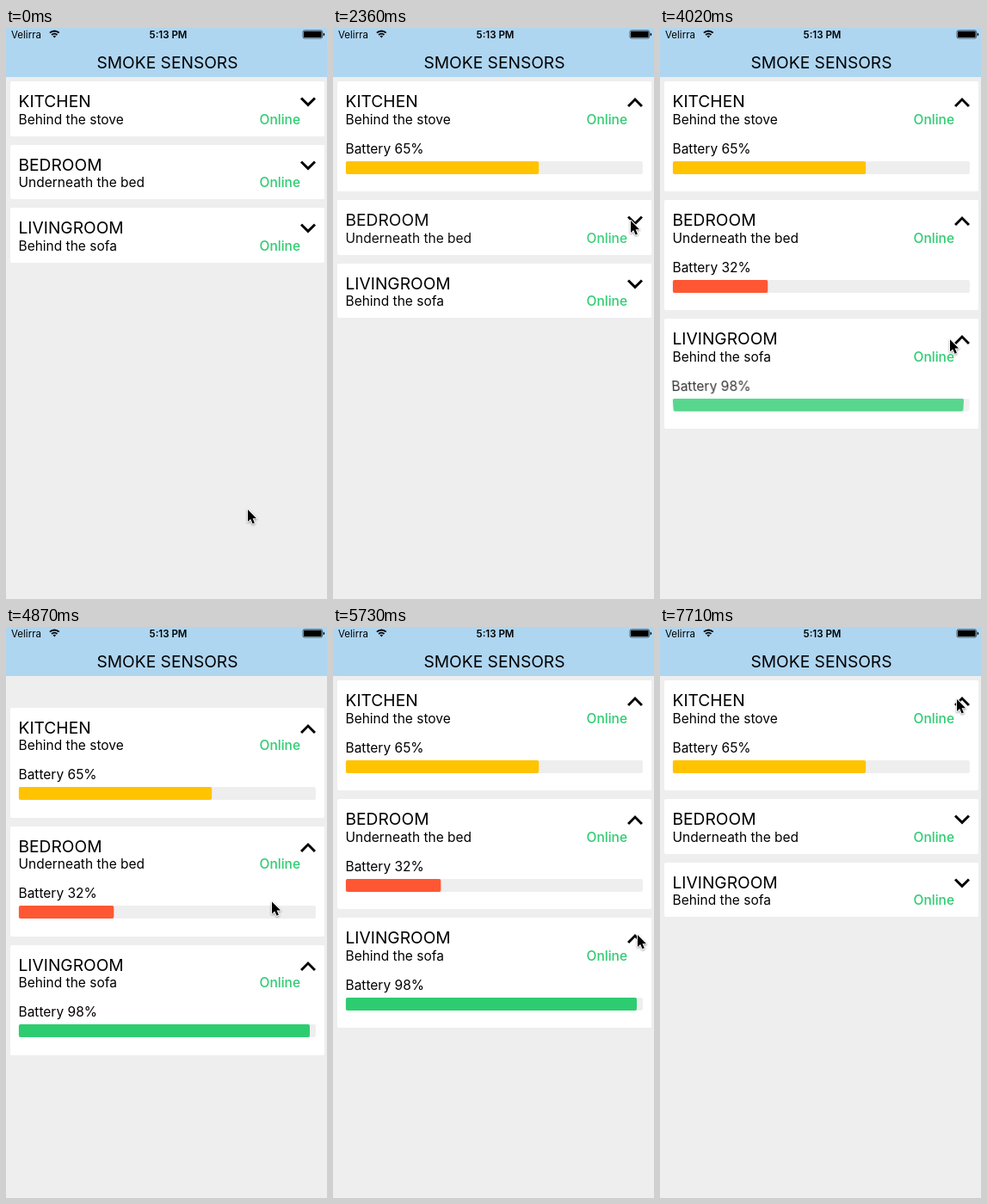
Write an HTML page that moves like this. It is 373 px wide and 664 px high and loops after 8 s.

```html
<!DOCTYPE html>
<html lang="en">
<head>
<meta charset="utf-8">
<title>Smoke sensors</title>
<style>
  html, body { margin: 0; width: 100%; height: 100%; overflow: hidden; background: #eee; }
  #stage { position: absolute; left: 0; top: 0; width: 373px; height: 664px; overflow: hidden;
    background: #eee; color: #000; font: 15.5px/20px Inter, Roboto, sans-serif; white-space: nowrap; }
  #stage * { position: absolute; }
  #top { left: 0; top: 0; width: 373px; height: 57px; background: #aed6f1; }
  .title { font-size: 19.2px; }
  #top .title { left: 0; width: 373px; top: 30px; text-align: center; text-indent: 2px; }
  .status { top: -2.5px; font-size: 11.5px; }
  #time { left: 0; width: 377px; text-align: center; font-weight: 600; }
  svg { left: 0; top: 0; overflow: visible; }
  .card { left: 5px; width: 365px; background: #fff; border-radius: 2px; overflow: hidden; }
  .head, .panel { left: 0; width: 365px; }
  .head { top: 0; height: 63.5px; }
  .head .title { left: 9.5px; top: 13px; }
  .place { left: 9.5px; top: 34.5px; }
  .state { right: 28px; top: 34.5px; color: #2ecc71; font-weight: 500; }
  .panel { top: 63.5px; height: 64.5px; }
  .label { left: 9.5px; top: 5px; }
  #cursor { filter: drop-shadow(0 1px 1px rgba(0,0,0,.4)); }
</style>
</head>
<body>
<div id="stage">
  <div id="list"></div>
  <div id="top">
    <span class="status" style="left:6px">Velirra</span>
    <span class="status" id="time">5:13 PM</span>
    <svg width="373" height="20">
      <g fill="none" stroke="#000" stroke-width="1.9">
        <path d="M50.9 5.7A7.6 7.6 0 0 1 61.7 5.7"/>
        <path d="M53.1 8A4.5 4.5 0 0 1 59.5 8"/>
      </g>
      <path d="M54.5 9.6A2.6 2.6 0 0 1 58.1 9.6L56.3 11.6Z"/>
      <rect x="345" y="2.8" width="22.6" height="9.2" rx="1.8" fill="none" stroke="#000" stroke-width=".6"/>
      <rect x="346" y="3.8" width="20.6" height="7.2" rx=".8"/>
      <path d="M368.7 5.6Q370.2 6 370.2 7.4T368.7 9.2Z"/>
    </svg>
    <span class="title">SMOKE SENSORS</span>
  </div>
  <svg id="cursor" width="14" height="20">
    <path d="M0 0V14L3.2 11.1L5.6 16.4L7.9 15.4L5.6 10.2H10.1Z" stroke="#fff" stroke-width="1.8"
      stroke-linejoin="round" paint-order="stroke"/>
  </svg>
</div>
<script>
const LOOP = 8000, SHUT = 63.5, FULL = 128, GAP = 10, BAR = 345;
const OPEN_WAIT = 116, OPEN_TIME = 425, CLOSE_TIME = 340;
const CHEVRON = {
  down: 'M352.9 18.4L346 25.3L339.1 18.4L337 20.5L346 29.5L355 20.5Z',
  up: 'M346 18.9L337 27.9L339.1 30L346 23.1L352.9 30L355 27.9Z'
};

// open / close are the moments of the taps
const sensors = [
  { name: 'KITCHEN', place: 'Behind the stove', level: 65, color: '#ffc300', open: 1545, close: Infinity },
  { name: 'BEDROOM', place: 'Underneath the bed', level: 32, color: '#ff5733', open: 2355, close: 7075 },
  { name: 'LIVINGROOM', place: 'Behind the sofa', level: 98, color: '#2ecc71', open: 3785, close: 6368 }
];

const clamp = v => Math.max(0, Math.min(1, v));
const linear = u => u;
const smooth = u => u * u * (3 - 2 * u);
const easeOut = u => 1 - (1 - u) * (1 - u);

// cubic-bezier(.25, .1, .25, 1)
function ease(x) {
  const at = (s, a, b) => 3 * s * (1 - s) * (1 - s) * a + 3 * s * s * (1 - s) * b + s * s * s;
  let lo = 0, hi = 1;
  for (let i = 0; i < 24; i++) {
    const mid = (lo + hi) / 2;
    if (at(mid, .25, .25) < x) lo = mid; else hi = mid;
  }
  return at(lo, .1, 1);
}

// piecewise linear through [position, value] stops
function ramp(u, stops) {
  for (let i = 1; i < stops.length; i++) {
    const [a, va] = stops[i - 1], [b, vb] = stops[i];
    if (u <= b) return va + (vb - va) * clamp((u - a) / (b - a));
  }
  return stops[stops.length - 1][1];
}

const moves = [
  { from: 30, till: 420, to: [274.5, 503.5] },
  { from: 690, till: 1480, to: [342, 92], bend: [256, 300] },
  { from: 1750, till: 2060, to: [346, 224] },
  { from: 2700, till: 3130, to: [343, 325], bend: [377, 228], pace: linear },
  { from: 3150, till: 3490, to: [337, 362.3], pace: easeOut },
  { from: 4060, till: 4590, to: [309, 258] },
  { from: 4660, till: 4980, to: [309, 342] },
  { from: 5180, till: 5390, to: [311, 324] },
  { from: 5400, till: 5740, to: [354, 358] },
  { from: 5740, till: 6020, to: [348, 361] },
  { from: 6560, till: 6910, to: [346, 222] },
  { from: 7260, till: 7700, to: [345, 84] }
];

function pointer(t) {
  let pos = [281, 560];
  for (const m of moves) {
    if (t <= m.from) break;
    const u = (m.pace || smooth)(clamp((t - m.from) / (m.till - m.from)));
    pos = pos.map((p, i) => {
      const mid = m.bend ? m.bend[i] : (p + m.to[i]) / 2;
      return (1 - u) * (1 - u) * p + 2 * u * (1 - u) * mid + u * u * m.to[i];
    });
  }
  return pos;
}

// rubber band while dragging, damped spring after release
function scrollOffset(t) {
  const view = 607, pull = y => (1 - 1 / (y * .55 / view + 1)) * view;
  if (t < 4660) return 0;
  if (t < 5170) return pull(pointer(t)[1] - 258);
  const w = 13 * (t - 5170) / 1000;
  return w > 11 ? 0 : pull(84) * (1 + w) * Math.exp(-w);
}

const press = dt => ramp(dt, [[0, 1], [90, .25], [200, 1]]);

function flip(s, t) {
  if (t >= s.close) {
    const u = ease(clamp((t - s.close) / CLOSE_TIME));
    return { angle: ramp(u, [[0, 0], [.3, -20], [1, 90]]), alpha: ramp(u, [[.3, 1], [1, 0]]) };
  }
  const u = ease(clamp((t - s.open - OPEN_WAIT) / OPEN_TIME));
  return {
    angle: ramp(u, [[0, 90], [.4, -20], [.6, 10], [.8, -5], [1, 0]]),
    alpha: ramp(u, [[0, 0], [.6, 1]])
  };
}

const list = document.getElementById('list');
const cursor = document.getElementById('cursor');
const bar = (width, color) =>
  `<rect x="9.9" y="29" width="${width}" height="15" rx="2" fill="${color}"/>`;

for (const s of sensors) {
  s.card = document.createElement('div');
  s.card.className = 'card';
  s.card.innerHTML = `
    <div class="head">
      <span class="title">${s.name}</span><span class="place">${s.place}</span>
      <span class="state">Online</span>
      <svg width="365" height="63"><path/></svg>
    </div>
    <div class="panel">
      <span class="label">Battery ${s.level}%</span>
      <svg width="365" height="64">${bar(BAR, '#eee')}${bar(BAR * s.level / 100, s.color)}</svg>
    </div>`;
  s.head = s.card.querySelector('.head');
  s.arrow = s.card.querySelector('path');
  s.panel = s.card.querySelector('.panel');
  list.appendChild(s.card);
}

function draw(t) {
  let y = 62 + scrollOffset(t);
  for (const s of sensors) {
    const opened = t >= s.open + OPEN_WAIT && t < s.close + CLOSE_TIME;
    const height = opened ? FULL : SHUT;
    s.card.style.top = y + 'px';
    s.card.style.height = height + 'px';
    s.head.style.opacity = press(t - s.open) * press(t - s.close);
    s.arrow.setAttribute('d', opened ? CHEVRON.up : CHEVRON.down);
    s.panel.style.display = opened ? 'block' : 'none';
    if (opened) {
      const { angle, alpha } = flip(s, t);
      s.panel.style.opacity = alpha;
      s.panel.style.transform = angle ? `perspective(400px) rotateX(${angle}deg)` : 'none';
    }
    y += height + GAP;
  }
  const [cx, cy] = pointer(t);
  cursor.style.transform = `translate(${cx}px, ${cy}px)`;
}

const start = performance.now();
function tick() {
  draw((performance.now() - start) % LOOP);
  requestAnimationFrame(tick);
}
draw(0);
requestAnimationFrame(tick);
</script>
</body>
</html>
```
